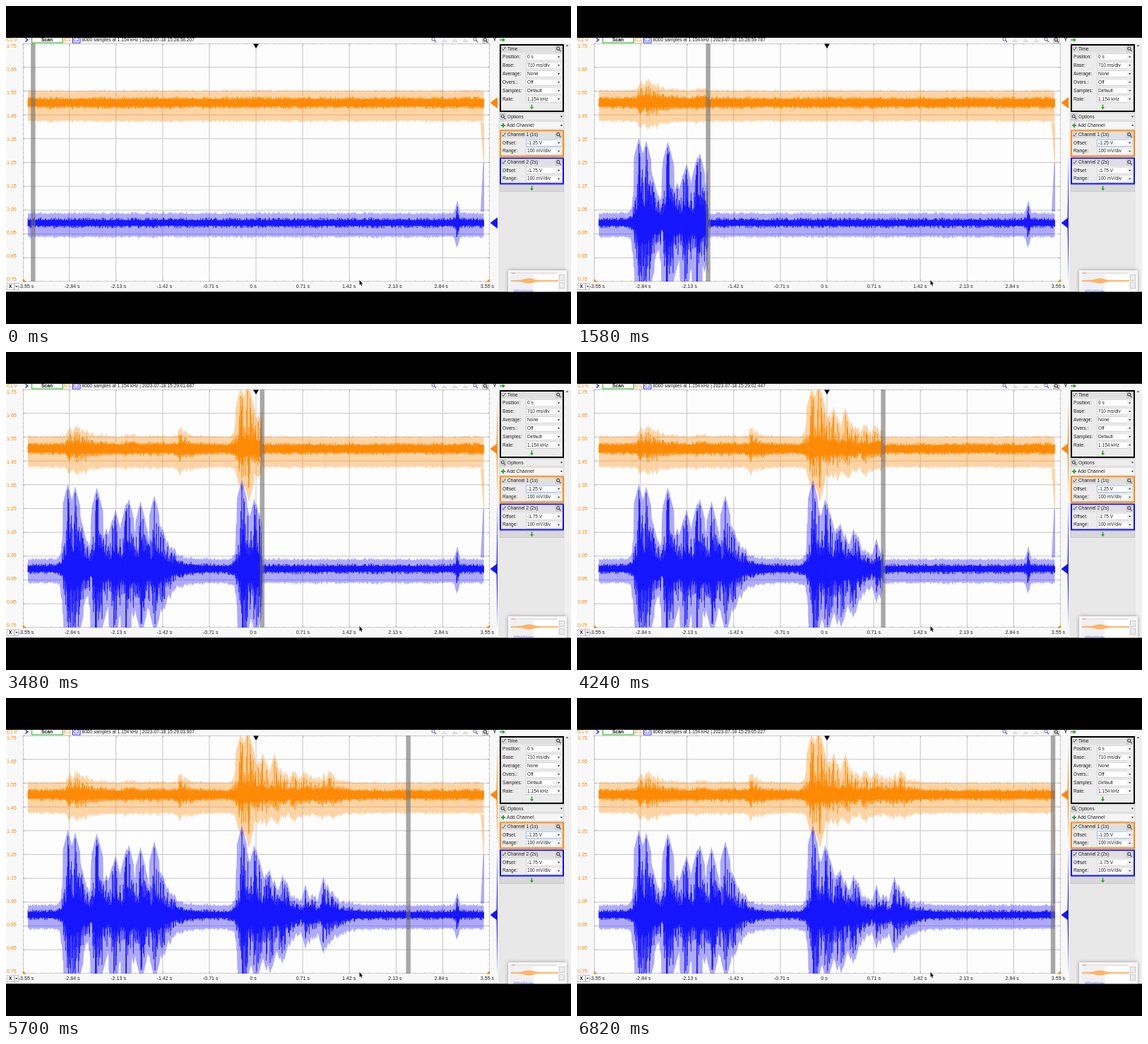
An HTML page with a canvas that plays this animation: 800 px wide and 450 px high, repeating every 6.85 s.

```html
<!DOCTYPE html>
<html lang="en">
<head>
<meta charset="utf-8">
<title>Oscilloscope scan</title>
<style>
html, body { margin: 0; width: 100%; height: 100%; overflow: hidden; background: #000; }
canvas { display: block; width: 800px; height: 450px; }
</style>
</head>
<body>
<canvas id="stage" width="800" height="450"></canvas>
<script>
const LOOP = 6850, SPEED = .0932;
const ORANGE = '#ff8800', BLUE = '#1414ff', GREEN = '#35a035';
const FONT = '"Liberation Sans", Arial, sans-serif';
const L = 24, R = 685, T = 53, B = 390;
const stage = document.getElementById('stage').getContext('2d');
let g = stage;

let seed = 7;
const rand = () => (seed = (seed * 16807) % 2147483647) / 2147483647;

function box(x, y, w, h, fill, line, width = 1) {
  if (fill) { g.fillStyle = fill; g.fillRect(x, y, w, h); }
  if (line) {
    g.strokeStyle = line;
    g.lineWidth = width;
    g.strokeRect(x + width / 2, y + width / 2, w - width, h - width);
  }
}

function path(p) {
  g.beginPath();
  for (let i = 0; i < p.length; i += 2) g.lineTo(p[i], p[i + 1]);
}

function poly(color, ...p) {
  g.fillStyle = color;
  path(p);
  g.fill();
}

function stroke(color, width, ...p) {
  g.strokeStyle = color;
  g.lineWidth = width;
  path(p);
  g.stroke();
}

function ring(color, width, x, y, r) {
  g.strokeStyle = color;
  g.lineWidth = width;
  g.beginPath();
  g.arc(x, y, r, 0, 7);
  g.stroke();
}

function text(s, x, y, color = '#222', size = 6.6, align = 'left', weight = '') {
  g.font = `${weight} ${size}px ${FONT}`;
  g.textAlign = align;
  g.textBaseline = 'middle';
  g.fillStyle = color;
  g.fillText(s, x, y);
}

// Quiet noise height, pale margins above and below, and how spiky the bursts are
const one = { mid: 137, noise: 4.8, up: 11, down: 20, ratio: .65, low: .1, power: 3, color: ORANGE, pale: 'rgba(255,136,0,.35)' };
const two = { mid: 307, noise: 3.6, up: 9, down: 15, ratio: 1, low: .22, power: 2.2, color: BLUE, pale: 'rgba(20,10,255,.34)' };

// Strikes are [x, height]; each rises fast and rings down.
function trace(ch, strikes, attack = 4, decay = 16) {
  const STEP = .5, SLOPE = 4, REACH = 14;
  const xs = [], hi = [], lo = [];
  const reach = e => ch.noise + rand() ** 3 * 4 + e * (ch.low + (1 - ch.low) * rand() ** ch.power);
  for (let x = 31; x <= 676.5; x += STEP) {
    const e = Math.max(0, ...strikes.map(([at, h]) =>
      h * Math.exp(x < at ? (x - at) / attack : (at - x) / decay)));
    xs.push(x);
    hi.push(reach(e));
    lo.push(reach(e * ch.ratio));
  }
  // The pale hull drapes a cone over every spike.
  const hull = (a, i) => {
    let top = 0;
    for (let k = -REACH; k <= REACH; k++) top = Math.max(top, (a[i + k] || 0) - Math.abs(k) * STEP * SLOPE);
    return top;
  };
  const band = new Path2D(), core = new Path2D();
  xs.forEach((x, i) => {
    band.lineTo(x, ch.mid - hull(hi, i) - ch.up);
    core.lineTo(x, ch.mid - hi[i]);
    core.lineTo(x, ch.mid + lo[i]);
  });
  for (let i = xs.length - 1; i >= 0; i--) band.lineTo(xs[i], ch.mid + hull(lo, i) + ch.down);
  return { ch, band, core };
}

const fresh = [
  trace(one, [[90, 25], [98, 25], [108, 20], [128, 11], [170, 9], [208, 7], [246, 20], [333, 100],
    [342, 90], [352, 54], [363, 46], [380, 41], [406, 30], [422, 24], [446, 24], [458, 20]]),
  trace(two, [[88, 132], [97, 116], [127, 122], [152, 92], [170, 112], [190, 100], [210, 94],
    [334, 118], [351, 108], [369, 94], [388, 68], [424, 36], [450, 48]])
];
const stale = [trace(one, []), trace(two, [[639, 32]], 1.5, 1.5)];
stale[0].band.addPath(new Path2D('M672 165L676 222H677V165Z'));
stale[1].band.addPath(new Path2D('M672 291L675.5 222H677V291Z'));

function gear(x, y) {
  box(x - 4.5, y - 4.5, 9, 9, '#dcdcdc', '#b4b4b4', .6);
  ring('#555', 1.2, x - .7, y - .8, 2);
  stroke('#555', 1.3, x + .8, y + .8, x + 3, y + 3);
}

function arrowDown(x, y) {
  stroke(GREEN, 1.6, x, y - 3.5, x, y + 1);
  poly(GREEN, x - 2.5, y, x + 2.5, y, x, y + 3.5);
}

const dropMark = (x, y) => poly('#444', x - 1.7, y - .9, x + 1.7, y - .9, x, y + 1.2);

function panel(y, h, color, title, rows) {
  box(699, y, 91, h, '#ececec', color, 2);
  box(701, y + 2, 87, 10, '#e0e0e0');
  box(702, y + 4, 5.5, 5.5, '#fff', '#999', .6);
  stroke('#222', .9, 703, y + 6.5, 704.4, y + 8.4, 707, y + 4.2);
  text(title, 710, y + 7);
  gear(782.5, y + 7);
  rows.forEach(([label, value], i) => {
    const cy = y + 18.2 + i * 11.9;
    text(label, 703, cy);
    box(736, cy - 5, 51, 10, '#fff', value === '-1.25 V' ? '#6aa0e8' : '#c4c4c4', .7);
    box(778.5, cy - 4.6, 8, 9.2, '#f2f2f2');
    dropMark(782.7, cy);
    text(value, 738, cy);
  });
}

function preview() {
  g.save();
  g.shadowColor = 'rgba(0,0,0,.35)';
  g.shadowBlur = 5;
  box(711, 374, 83, 34, '#f6f6f6');
  g.restore();
  box(714, 380, 33, 24, '#f0f0f3');
  box(747, 380, 34, 24, '#fff');
  stroke('#bbb', .6, 714, 378, 780, 378);
  stroke('#e08080', .9, 716, 378, 721, 378);
  for (let x = 715; x < 782; x++) {
    const h = 1 + 2.6 * Math.exp(-(((x - 740) / 9) ** 2));
    box(x, 389 - h, 1, h * 2, 'rgba(255,165,70,.8)');
    if (x > 718 && x < 747) box(x, 401 + rand() * 2, .7, 3, 'rgba(90,90,255,.5)');
  }
  for (const y of [380, 391]) box(783, y, 8, 9, '#ececec', '#bbb', .6);
}

function drawGrid() {
  box(L, T, R - L, B - T, '#fdfdfd');
  for (let i = 1; i < 10; i++) {
    const x = L - .5 + i * 66.1, y = T + i * 33.7;
    stroke('#c6c6c6', 1, L, y, R, y);
    stroke('#c6c6c6', 1, x, T, x, B);
  }
  for (let i = 0; i <= 50; i++) {
    const x = L + i * 13.22, y = T + i * 6.74, n = i % 5 ? 1.5 : 3;
    stroke('#999', .6, x, T, x, T + n);
    stroke('#999', .6, x, B, x, B - n);
    stroke('#999', .6, L, y, L + n, y);
    stroke('#999', .6, R, y, R - n, y);
  }
  box(L, T, R - L, B - T, null, '#b8b8b8', .7);

  for (let i = 0; i <= 10; i++) {
    text((1.75 - i / 10).toFixed(2), 1, 57 + i * 33.05, ORANGE, 7.1);
    const s = i === 5 ? '0' : ((i - 5) * .71).toFixed(2);
    text(s + ' s', 28.5 + i * 65.3 - (i === 5 ? 5 : 0), 397.3, '#222', 7.1, 'center');
  }
  box(1, 392, 10.5, 10, '#fff', '#aaa', .7);
  text('X', 6.2, 397.3, '#111', 6.6, 'center', 'bold');
  box(12, 392, 6, 10, '#fff', '#aaa', .7);
  dropMark(15, 397);
}

function drawToolbar() {
  text('C1 V', 1, 48, ORANGE, 6.8);
  stroke(BLUE, 1.3, 27.5, 45.5, 30.8, 47.8, 27.5, 50.5);
  box(36, 42, 45, 10.5, '#fff', '#35c435', 1.2);
  text('Scan', 58, 47.8, '#111', 6.8, 'center', 'bold');
  box(82, 42, 10, 10.5, '#fff', '#f4c08a', .7);
  text('C1', 87, 47.8, ORANGE, 6.8, 'center');
  box(94, 42, 11.5, 10.5, '#fff', BLUE, .9);
  text('C2', 99.7, 47.8, BLUE, 6.8, 'center');
  for (const x of [605, 664]) {
    ring('#7a82b8', 1.1, x, 47, 2);
    stroke('#667', 1.2, x + 1.5, 48.5, x + 4, 51);
  }
  for (const x of [620, 635, 650]) {
    stroke('#bbb', 1, x - 3, 50, x + 4, 50);
    stroke('#bbb', .8, x, 46, x, 49);
  }
  gear(679, 48.5);
  text('Y', 692, 48, '#222', 6.6, 'center', 'bold');
  stroke(GREEN, 1.5, 699, 48, 704, 48);
  poly(GREEN, 703, 45.3, 707, 48, 703, 50.7);
}

function drawPanels() {
  box(697, 53, 103, 351.5, '#e8e8e8');
  box(791, 53, 9, 351.5, '#f0f0f0');
  poly('#666', 792.5, 57, 796.5, 57, 794.5, 54.5);
  panel(54, 96, '#000', 'Time', [
    ['Position:', '0 s'], ['Base:', '710 ms/div'], ['Average:', 'None'],
    ['Overs.:', 'Off'], ['Samples:', 'Default'], ['Rate:', '1.154 kHz']]);
  arrowDown(744.5, 143);
  box(699, 151, 91, 11, '#ececec', '#ccc', .6);
  gear(704, 156.8);
  text('Options', 710, 157);
  dropMark(786.5, 156.5);
  box(699, 163, 91, 11.5, '#f6f6f6', '#ccc', .6);
  stroke(GREEN, 2, 701, 169, 707, 169);
  stroke(GREEN, 2, 704, 166, 704, 172);
  text('Add Channel', 709, 169);
  dropMark(786.5, 169);
  panel(175.5, 38, ORANGE, 'Channel 1 (1s)', [['Offset:', '-1.25 V'], ['Range:', '100 mV/div']]);
  panel(214.5, 38, '#1010f0', 'Channel 2 (2s)', [['Offset:', '-1.75 V'], ['Range:', '100 mV/div']]);
  box(699, 253, 91, 10, '#d8d8d8', '#c4c4c4', .6);
  arrowDown(744.5, 258);
  preview();
}

function drawTraces(list, x0, x1) {
  g.save();
  g.beginPath();
  g.rect(x0, T, x1 - x0, B - T);
  g.clip();
  g.lineWidth = .65;
  for (const { ch, band, core } of list) {
    g.fillStyle = ch.pale;
    g.fill(band);
    g.strokeStyle = ch.color;
    g.stroke(core);
  }
  g.restore();
}

// Value histogram at the right edge; its thin tail grows once a burst is scanned.
function histogram({ mid, color }, tail) {
  poly(color, 685.5, mid, 692, mid - 5, 696, mid - 8, 696, mid + 8, 692, mid + 5);
  poly(color, 694.5, mid, 696, mid - tail, 696, Math.min(B, mid + tail));
}

const base = document.createElement('canvas');
base.width = 800;
base.height = 450;
g = base.getContext('2d');
box(0, 0, 800, 450, '#000');
box(0, 45, 800, 359.5, '#f8f8f8');
drawGrid();
drawToolbar();
drawPanels();
box(0, 0, 800, 45, '#000');
box(0, 404.5, 800, 45.5, '#000');
g = stage;

function stamp(ms) {
  const s = 58.206 + ms / 1000;
  return `15:${s < 60 ? 28 : 29}:${(s % 60).toFixed(3).padStart(6, '0')}`;
}

function frame() {
  const ms = performance.now() % LOOP;
  const x = 38.3 + ms * SPEED;
  const grown = start => Math.min(1, Math.max(0, (ms - start) / 400));
  g.drawImage(base, 0, 0);
  text('8000 samples at 1.154 kHz | 2023-07-18 ' + stamp(ms), 107.5, 47.8);
  drawTraces(fresh, L, x);
  drawTraces(stale, x, R);
  box(x - 3.2, T, 6.4, B - T, 'rgba(110,110,110,.6)');
  histogram(one, 70 * grown(3050));
  histogram(two, 95 * grown(500));

  poly('#000', 350, 53.5, 358, 53.5, 354, 60);
  poly(ORANGE, L, 386, L, 390.5, L + 5, 390.5);
  poly(ORANGE, R, 386, R, 390.5, R - 5, 390.5);
  poly('#111', 500.5, 388, 500.5, 395, 502, 393.6, 503.2, 396, 504.2, 395.4, 503.2, 393.2, 505, 393);
  requestAnimationFrame(frame);
}
frame();
</script>
</body>
</html>
```
